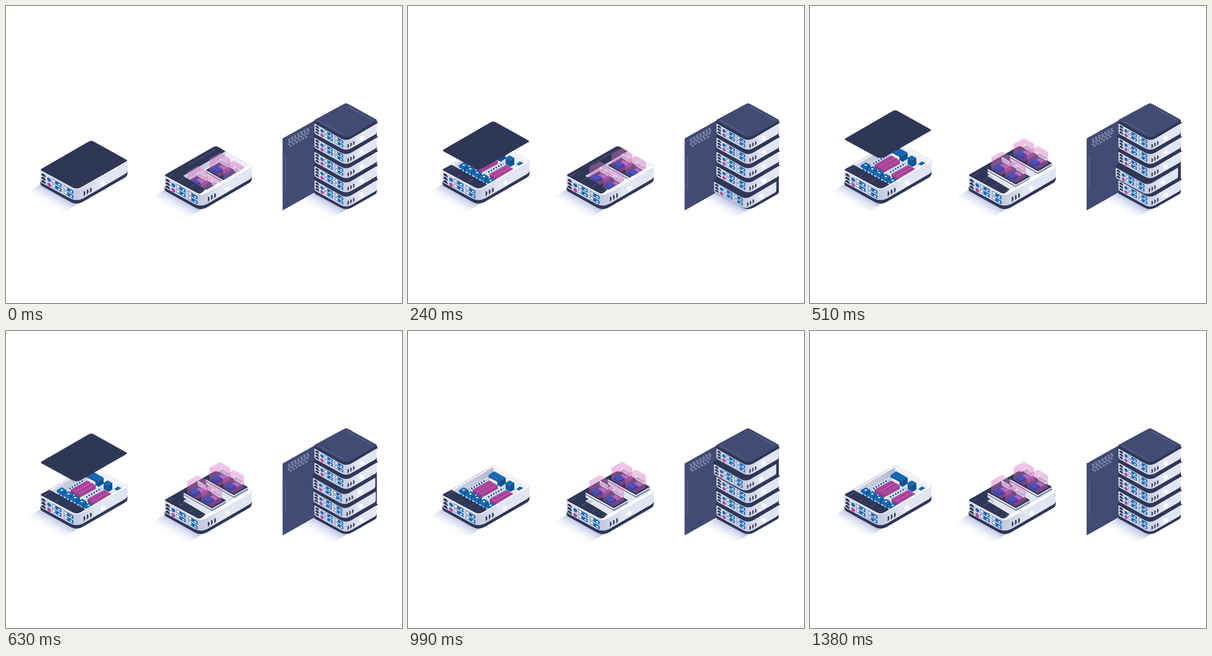
Animation, 864 px wide and 648 px high, one loop 2700 ms. Source, as an HTML page without scripts:

```html
<!DOCTYPE html>
<html lang="en">
<head>
<meta charset="utf-8">
<title>Server hardware</title>
<style>
html, body { margin: 0; width: 100%; height: 100%; overflow: hidden; background: #fff; }
svg { display: block; width: 100vw; height: 100vh; }
.navy { fill: #2f3757; }
.blue { fill: #1769b5; }
.deep { fill: #0e518f; }
.pink { fill: #b1479f; }
.pale { fill: #e3e6f3; }
.white { fill: #fff; }
.hair { fill: none; stroke: #7d86ad; stroke-width: .7; }
.lid { animation: lift 2.7s infinite, fade 2.7s linear infinite; }
.chips { animation: rise 2.7s infinite; }
.unit { animation: slide 2.7s ease-in-out infinite; }
.u2 { animation-delay: .22s; }
.u3 { animation-delay: .44s; }
.u4 { animation-delay: .66s; }
.u5 { animation-delay: .88s; }
@keyframes lift {
  0%, 2.2% { transform: none; }
  2.22% { transform: translateY(-7.5px); animation-timing-function: cubic-bezier(.333, 1, .667, 1); }
  31.85%, 100% { transform: translateY(-72px); }
}
@keyframes fade {
  0%, 23.33% { opacity: 1; }
  34.44%, 100% { opacity: 0; }
}
@keyframes rise {
  0%, 6.5% { transform: translateY(35px); animation-timing-function: cubic-bezier(.333, 1, .667, 1); }
  28.7%, 100% { transform: none; }
}
@keyframes slide {
  0%, 2.96% { transform: none; }
  10.74% { transform: translate(-6px, 3.4px); }
  18.52%, 100% { transform: none; }
}
</style>
</head>
<body>
<svg viewBox="0 0 864 648">
<defs>
  <linearGradient id="shell" gradientUnits="userSpaceOnUse" x1="0" y1="0" x2="190" y2="0">
    <stop offset="0" stop-color="#d6d9e8"/>
    <stop offset=".4" stop-color="#c5c9de"/>
    <stop offset=".66" stop-color="#e3e6f3"/>
    <stop offset="1" stop-color="#e1e4f2"/>
  </linearGradient>
  <linearGradient id="unitShell" href="#shell" x2="150"/>
  <linearGradient id="shade" gradientUnits="userSpaceOnUse" x1="40" y1="55" x2="23" y2="85">
    <stop offset="0" stop-color="#bcc5e4"/>
    <stop offset="1" stop-color="#fff" stop-opacity="0"/>
  </linearGradient>
  <linearGradient id="wall">
    <stop offset="0" stop-color="#d5d8e7"/>
    <stop offset="1" stop-color="#b3b8d1"/>
  </linearGradient>
  <linearGradient id="glow" x1="0" y1="0" x2="0" y2="1">
    <stop offset="0" stop-color="#e27fcc" stop-opacity=".42"/>
    <stop offset="1" stop-color="#c24fae" stop-opacity=".48"/>
  </linearGradient>

  <path id="top" d="M3-2L106-61.5Q111-64 116-61.5L187-22Q191-20 187-17.5L89 38.5Q79 44 69 38.5L3 2.5Q-1 0 3-2Z"/>

  <g id="bay">
    <rect width="21" height="7.6" rx="1" class="blue"/>
    <rect width="8" height="7.6" rx="1" fill="#8e9cc4"/>
    <rect x="1.8" y="1.8" width="4.4" height="4" class="white"/>
    <rect x="14" y="3" width="4.2" height="3" class="white"/>
  </g>
  <g id="panel" transform="matrix(1 .57 0 1 0 0)">
    <g class="navy">
      <path id="slit" d="M2 10.5Q3 5 7 5T12 10.5Z"/>
      <use href="#slit" y="7.3"/>
      <use href="#slit" y="14.6"/>
    </g>
    <circle cx="19" cy="11.3" r="4.1" class="blue"/>
    <circle cx="19" cy="22" r="4.1" class="pink"/>
    <use href="#bay" x="25" y="5"/>
    <use href="#bay" x="25" y="15.2"/>
    <use href="#bay" x="51" y="5"/>
    <use href="#bay" x="51" y="15.2"/>
  </g>
  <g id="vents" class="navy">
    <path id="vent" d="M-1.5-5Q2-5.5 2-.8T-1.5 6Z"/>
    <use href="#vent" x="7" y="-3.7"/>
    <use href="#vent" x="14" y="-7.4"/>
  </g>

  <g id="server">
    <path d="M0 32L-36 54 46 98 82 74Z" fill="url(#shade)"/>
    <path class="navy" d="M0 0V29Q0 34 4 36L65 70Q79 78 93 70L184 17.5Q190 14 190 9V-20L79 44Z"/>
    <path fill="url(#shell)" d="M0 1V23Q0 27 3 29L65 63Q79 70 93 63L185 9.5Q190 6.5 190 1V-18Q190-20 187-22L116-62Q111-65 106-62L4-3Q0-1 0 1Z"/>
    <use href="#top" y="1.8" class="white"/>
    <use href="#panel"/>
    <use href="#vents" x="96" y="52"/>
    <circle cx="137" cy="29" r="5" class="white"/>
  </g>

  <g id="heatsink">
    <path class="pink" d="M141 346L177 326 196 337 160 357Z"/>
    <path d="M141 346L160 357V364L141 353Z" fill="#8f3a8a"/>
    <path d="M160 357L196 337V344L160 364Z" fill="#a03f94"/>
    <path d="M147 349L183 329M154 353L190 333" stroke="#8f3a8a" stroke-width="1.3"/>
    <path d="M150 351L186 331" stroke="#c868b6"/>
  </g>
  <g id="card">
    <path d="M134 341L174 318V328L134 351Z" fill="#dbe5f4" stroke="#9fb7da" stroke-width=".8"/>
    <path d="M138 344L171 325" stroke="#17518f" stroke-width="4" stroke-dasharray="3 3.2"/>
  </g>
  <g id="fan">
    <path d="M111 347L122 353V370L111 364Z" fill="#d4e2f3"/>
    <path class="blue" d="M111 347L122 341 132 347 122 353ZM111 347L122 353V358L111 352Z"/>
    <path class="deep" d="M122 353L132 347V362L122 370Z"/>
    <ellipse cx="116" cy="359.5" rx="3.4" ry="4" class="blue"/>
    <ellipse cx="121.5" cy="347" rx="2.6" ry="1.5" class="white"/>
  </g>

  <g id="chip">
    <path class="pale" d="M-31 38V49L0 66V55Z"/>
    <path d="M31 38V49L0 66V55Z" fill="#cdd1e4"/>
    <path d="M-31 42.5L0 60 31 42.5" fill="none" stroke="#2f3757" stroke-width="1.3"/>
    <path class="navy" d="M-31 38L0 20.5 31 38 0 55.5Z"/>
    <path d="M-23 13L0 0 22 13V39L0 52-23 39Z" fill="url(#glow)"/>
    <path d="M-5 31L3 26.5 15 33.5 6 38.5Z" fill="#bb68bd"/>
    <path d="M-19 35L-7 28.5 5 35.5-7 42Z" fill="#4a52bb"/>
    <path d="M-19 35L-7 42V46L-19 39Z" fill="#3445a8"/>
    <path d="M-7 42L5 35.5V39.5L-7 46Z" fill="#4b3a98"/>
    <path d="M0 12L18 22.5V33L0 22.5Z" fill="#f1e6f4"/>
    <path d="M2 18.5L17 27.2" stroke="#81518f" stroke-width="7" stroke-dasharray="1.2 1.9"/>
  </g>

  <g id="unit">
    <path d="M0-4.5L58 28.5Q69 34.5 80 28.5L136-4.5" fill="none" stroke="#2f3757" stroke-width="9"/>
    <path fill="url(#unitShell)" d="M0 0V18Q0 22 3 24L58 54.5Q69 60.5 80 54.5L133 24Q136 22 136 18V0L80 33Q69 39 58 33Z"/>
    <use href="#panel" transform="translate(0 -2.5) scale(.87)"/>
    <use href="#vents" transform="translate(73.5 49.5) scale(.87)"/>
    <circle cx="103" cy="32" r="5" class="white"/>
  </g>

  <clipPath id="bayClip"><path d="M95 349L186 297 260 338 172 390Z"/></clipPath>
  <clipPath id="trayClip"><path d="M386 371L438 401 530 348V240H386Z"/></clipPath>
</defs>

<!-- open server -->
<use href="#server" x="75" y="357"/>
<g clip-path="url(#bayClip)">
  <path d="M95 349L186 297 260 338 172 390Z" fill="#e4e7f2"/>
  <path d="M95 349L186 297V318L115 360Z" fill="url(#wall)"/>
  <path d="M186 297L260 338 246 347 186 317Z" fill="#eef0f9"/>
  <path class="blue" d="M176 314L188 306 213 320 202 327Z"/>
  <path class="deep" d="M202 327L213 320V333L202 340Z"/>
  <path d="M176 314L202 327V340L195 336V329L176 319Z" fill="#125b9f"/>
  <path class="blue" d="M213 331L222 326 232 331.5 223 337Z"/>
  <path class="deep" d="M223 337L232 331.5V346L223 351Z"/>
  <path d="M213 331L223 337V351L213 345Z" fill="#125b9f"/>
  <path class="blue" d="M236 345L244 339 255 344 246 350Z"/>
  <use href="#card"/>
  <use href="#heatsink"/>
  <use href="#card" x="37" y="18.5"/>
  <use href="#heatsink" x="37" y="20.5"/>
  <use href="#fan"/>
  <use href="#fan" x="14.7" y="8.3"/>
  <use href="#fan" x="29.4" y="16.6"/>
  <use href="#fan" x="44.1" y="24.9"/>
  <use href="#fan" x="58.8" y="33.2"/>
</g>
<path class="navy" d="M78 355L95 346.5 173 389.5 162 396Q154 400 146 396L78 359.5Q74 357 78 355Z"/>
<path class="hair" d="M84 359L98 351M108 372L116 367.5M131 384L142 378"/>
<use href="#top" x="75" y="357" class="lid navy"/>

<!-- modular server -->
<use href="#server" x="346" y="369"/>
<path class="navy" d="M349 367L453 307.5Q458 305 463 307.5L479 317 387 370.5 436 400 433 402Q425 412 417 408L349 371.5Q345 369 349 367Z"/>
<path d="M387 371L478 318.5 530 348 438 400Z" fill="#e2e5f1"/>
<path d="M387 371L478 318.5V329L397 376Z" fill="#c9cde0"/>
<path d="M478 318.5L530 348 521 353 478 329Z" fill="#eef0f9"/>
<path class="hair" d="M395 349L456 314M355 371L366 365M378 382L390 375M401 395L411 389M423 405L434 399"/>
<g clip-path="url(#trayClip)">
  <g class="chips">
    <use href="#chip" x="467" y="285"/>
    <use href="#chip" x="497" y="302"/>
    <use href="#chip" x="418.5" y="314"/>
    <use href="#chip" x="449" y="331"/>
  </g>
</g>

<!-- rack -->
<path d="M0 32L-36 54 34 90 70 68Z" transform="translate(673 376)" fill="url(#shade)"/>
<path d="M603.5 289L673 250V407L603.5 446Z" fill="#414b73"/>
<path class="hair" d="M610 326V400"/>
<g fill="none" stroke="#8188ad" stroke-width="3.6" stroke-dasharray="5 2.8">
  <path id="holes" d="M615 292.5L660 267"/>
  <use href="#holes" x="1.5" y="4.2"/>
  <use href="#holes" y="10"/>
  <path d="M619 306L658 284"/>
</g>
<path class="navy" d="M673 249L742 212 809 249V404Q809 409 805 411L754 440Q742 446.5 730 440L673 409Z"/>
<use href="#unit" x="673" y="380" class="unit"/>
<use href="#unit" x="673" y="349" class="unit u2"/>
<use href="#unit" x="673" y="318" class="unit u3"/>
<use href="#unit" x="673" y="287" class="unit u4"/>
<use href="#unit" x="673" y="256" class="unit u5"/>
<path class="navy" d="M673 249V256L731 289Q742 295 753 289L809 256V249L742 220Z"/>
<path d="M675 247.5L735 215Q742 211 749 215L807 247Q810 249 807 251L753 282.5Q742 289 731 282.5L675 251Q672 249 675 247.5Z" fill="#414b73"/>
<path class="hair" d="M682 250.5L736 280M745 219L799 249"/>
</svg>
</body>
</html>
```
